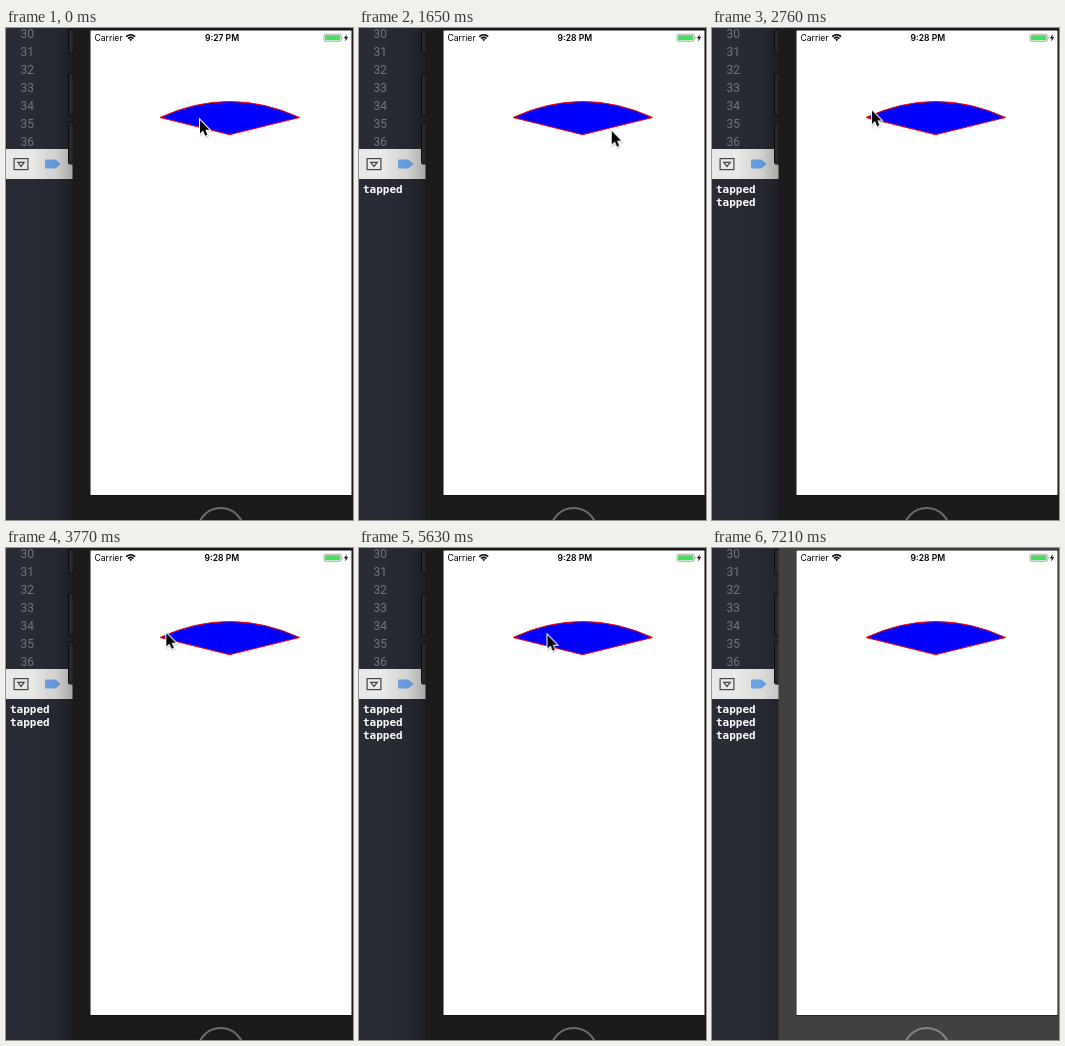
Recreate the animation shown at these times as an HTML page. Size 347x492 px, loop 7230 ms.

```html
<!DOCTYPE html>
<html lang="en">
<head>
<meta charset="utf-8">
<title>Tap a fan shape</title>
<style>
  html, body { margin: 0; width: 100%; height: 100%; overflow: hidden; background: #292c35; }
  svg { display: block; width: 100%; height: 100%; }

  .lines { font: 12px Roboto, sans-serif; fill: #73767c; }
  .log { font: bold 11px "DejaVu Sans Mono", monospace; fill: #fff; }
  .status { font: 8.6px Inter, sans-serif; fill: #000; }
  .clock { font-weight: 600; text-anchor: middle; }

  .bezel, .ring, .shadow, .log text, .clock, .cursor {
    animation: 7230ms step-end infinite;
  }
  .bezel { fill: #1b1b1b; animation-name: bezel; }
  .ring { fill: none; stroke: #6c6c6c; stroke-width: 2; animation-name: ring; }
  .shadow { animation-name: shadow; }
  .log .first { animation-name: first; }
  .log .second { animation-name: second; }
  .log .third { animation-name: third; }
  .before { animation-name: before; }
  .after { animation-name: after; }
  .cursor { animation-name: move; }

  /* The window loses focus just before the loop ends. */
  @keyframes bezel { 99.72%, 100% { fill: #414141; } }
  @keyframes ring { 99.72%, 100% { stroke: #858585; } }
  @keyframes shadow { 99.72%, 100% { opacity: .55; } }

  @keyframes first { 0% { opacity: 0; } .82%, 100% { opacity: 1; } }
  @keyframes second { 0% { opacity: 0; } 32.64%, 100% { opacity: 1; } }
  @keyframes third { 0% { opacity: 0; } 77.86%, 100% { opacity: 1; } }
  @keyframes before { 0% { opacity: 1; } 5.67%, 100% { opacity: 0; } }
  @keyframes after { 0% { opacity: 0; } 5.67%, 100% { opacity: 1; } }

  @keyframes move {
    0% { transform: translate(194px, 92px); }
    4.86% { transform: translate(194px, 92px); animation-timing-function: steps(6); }
    9.68% { transform: translate(259px, 108px); }
    12.86% { transform: translate(258.5px, 107px); }
    13.69% { transform: translate(258.5px, 106px); }
    22.01% { transform: translate(258.5px, 106px); animation-timing-function: steps(7); }
    27.66% { transform: translate(218px, 84.5px); }
    35.06% { transform: translate(218px, 84.5px); animation-timing-function: steps(2); }
    36.72% { transform: translate(188px, 90px); animation-timing-function: steps(2); }
    38.17% { transform: translate(160px, 82.5px); animation-timing-function: steps(5); }
    43.15% { transform: translate(158.5px, 75.5px); }
    51.03% { transform: translate(158.5px, 75.5px); animation-timing-function: steps(3); }
    54.35% { transform: translate(164px, 104px); }
    55.46% { transform: translate(164.5px, 101px); }
    67.08% { transform: translate(176px, 96px); animation-timing-function: steps(4); }
    70.4% { transform: translate(188.5px, 87px); }
    83.67% { transform: translate(215px, 190px); }
    84.5% { transform: translate(266px, 440px); opacity: 1; }
    85.33%, 100% { transform: translate(266px, 440px); opacity: 0; }
  }
</style>
</head>
<body>
<svg viewBox="0 0 347 492">
  <defs>
    <linearGradient id="shade">
      <stop offset="0" stop-color="#000" stop-opacity="0"/>
      <stop offset=".6" stop-color="#000" stop-opacity=".1"/>
      <stop offset="1" stop-color="#000" stop-opacity=".28"/>
    </linearGradient>
  </defs>

  <!-- Editor and console -->
  <rect width="347" height="492" fill="#292c35"/>
  <g class="lines">
    <text x="14.5" y="10.3">30</text>
    <text x="14.5" y="28.3">31</text>
    <text x="14.5" y="46.3">32</text>
    <text x="14.5" y="64.3">33</text>
    <text x="14.5" y="82.3">34</text>
    <text x="14.5" y="100.3">35</text>
    <text x="14.5" y="118.3">36</text>
  </g>
  <rect y="121" width="67" height="30" fill="#e8e8e7"/>
  <g fill="none" stroke="#454545" stroke-width="1.2">
    <rect x="8.1" y="130.6" width="13.8" height="11"/>
    <path d="M11.8 134.3H18.2L15 138.4Z"/>
  </g>
  <path d="M40 131.5H49.5L54.5 136L49.5 140.5H40Q39 140.5 39 139.5V132.5Q39 131.5 40 131.5Z" fill="#71a9ef"/>
  <rect class="shadow" x="24" width="43" height="492" fill="url(#shade)"/>
  <g class="log">
    <text class="first" x="4" y="165">tapped</text>
    <text class="second" x="4" y="178">tapped</text>
    <text class="third" x="4" y="191">tapped</text>
  </g>

  <!-- Phone -->
  <g fill="#292929" stroke="#090909">
    <rect x="62.5" y="1.5" width="8" height="24.5" rx="1.5"/>
    <rect x="62.5" y="45.5" width="8" height="42" rx="1.5"/>
    <rect x="62.5" y="94" width="8" height="42" rx="1.5"/>
  </g>
  <rect class="bezel" x="66.5" width="280.5" height="492"/>
  <rect x="84" y="2" width="262" height="465.5" fill="#0a0a0a"/>
  <rect x="84.5" y="2.5" width="261" height="464.5" fill="#fff"/>
  <circle class="ring" cx="214.7" cy="503" r="23"/>

  <!-- Status bar -->
  <g class="status">
    <text x="88.5" y="12.7">Carrier</text>
    <text class="clock before" x="216" y="12.7">9:27 PM</text>
    <text class="clock after" x="215.8" y="12.7">9:28 PM</text>
  </g>
  <g fill="none" stroke="#000" stroke-width="1.5">
    <path d="M120.2 8.6Q124.7 4.8 129.2 8.6"/>
    <path d="M121.9 10.5Q124.7 8.2 127.5 10.5"/>
  </g>
  <path d="M123.2 11.5Q124.7 10.3 126.2 11.5L124.7 13.2Z"/>
  <rect x="317.9" y="6.3" width="17.4" height="7" rx="1.4" fill="#fff" stroke="#8d8d8d" stroke-width=".7"/>
  <rect x="318.9" y="7.3" width="15.4" height="5" rx=".6" fill="#4cd964"/>
  <path d="M336 8.4Q337.3 9.8 336 11.2Z" fill="#8d8d8d"/>
  <path d="M340.8 6.2L337.9 10.2H339.8L339.1 13.4L342.2 9.2H340.2Z"/>

  <path d="M154 89.5Q223.7 57.5 293.5 89.5L223.6 106.7Z" fill="#00f" stroke="#f00"/>

  <g class="cursor">
    <path d="M.5 1.5V15L3.6 12.2L5.6 17L8 16L6 11.3H10.2Z" fill="#000" stroke="#000" stroke-width="2" opacity=".16"/>
    <path d="M0 0V13.4L3.1 10.6L5.2 15.7L7.4 14.8L5.3 9.8H9.4Z" stroke="#fff" stroke-width="2" paint-order="stroke"/>
  </g>
</svg>
</body>
</html>
```
